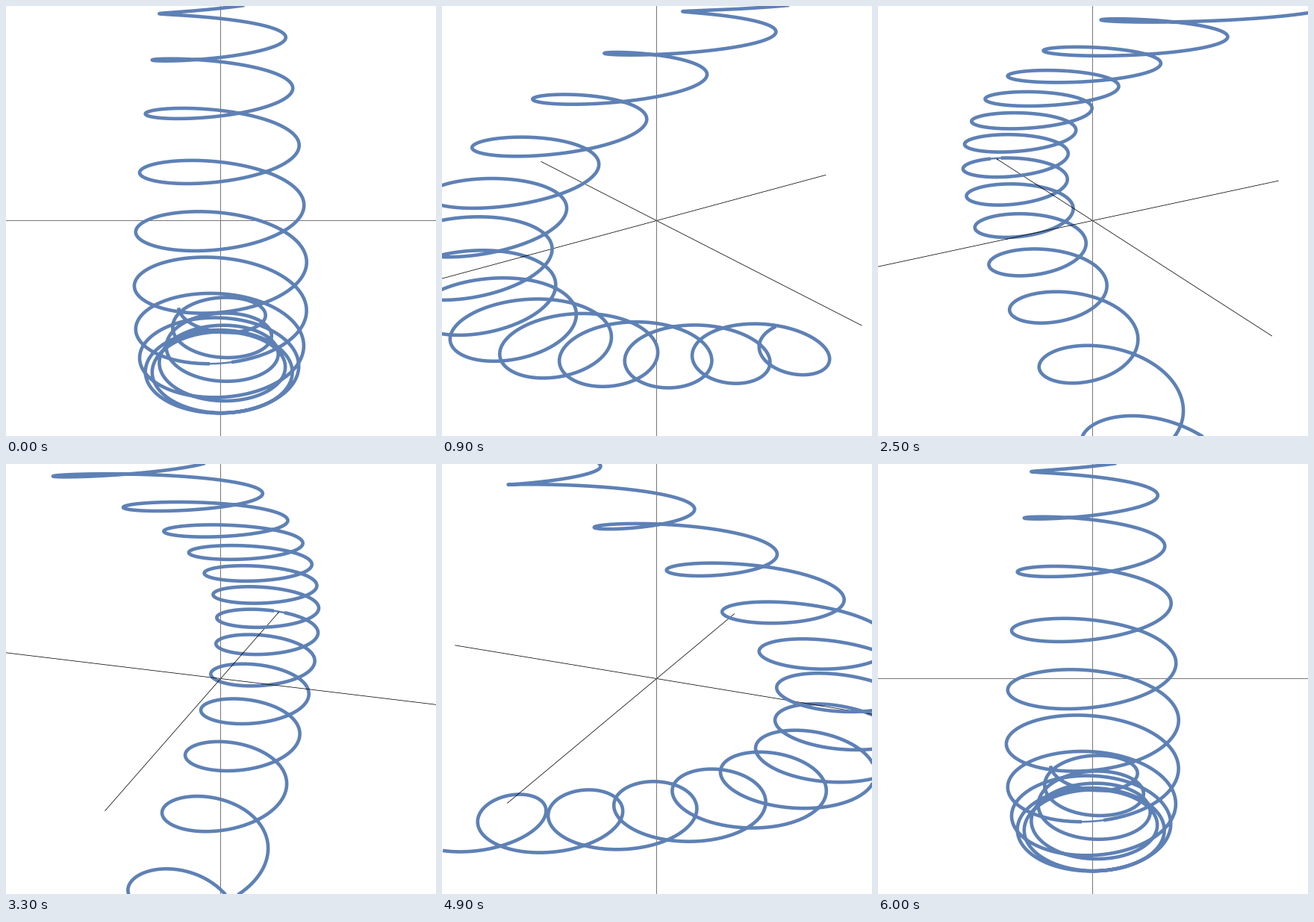
These frames come from a looping animation (576x576 px, 6100 ms). A matplotlib script:

```python
import numpy as np
import matplotlib.pyplot as plt
from matplotlib.animation import FuncAnimation

SIZE, DPI = 576, 100
PX = 72 / DPI              # one pixel in points
FRAMES, STEP_MS = 61, 100
CENTER = 287.5
FOCAL = 908
CAM_DIST, CAM_HEIGHT = 10, 4
TILT = CAM_HEIGHT / CAM_DIST
RISE = 1.005               # height gained per unit of t
T_END = 3.783              # the coil is cut where x reaches -4
BLUE = "#5e81b5"
STROKE = 4.6


def coil(t):
    """Helix wound around a parabola."""
    return np.array([3 - t**2 / 2 + np.cos(12 * t), np.sin(12 * t), RISE * t])


def project(points, angle):
    """Orbit the camera around z; return screen x, screen y and depth."""
    x, y, z = points
    c, s = np.cos(angle), np.sin(angle)
    right = y * c - x * s
    near = y * s + x * c
    dist = CAM_DIST - near
    drop = CAM_HEIGHT - z
    depth = (dist + TILT * drop) / np.hypot(1, TILT)
    lower = (drop - TILT * dist) / np.hypot(1, TILT)
    return CENTER + FOCAL * right / depth, CENTER + FOCAL * lower / depth, depth


def crossing(line, curve):
    """Keep only the parts of a line that pass in front of the curve."""
    lx, ly, ld = (a[:, None] for a in line)
    cx, cy, cd = curve
    touching = (lx - cx) ** 2 + (ly - cy) ** 2 < (STROKE / 2 + 0.5) ** 2
    over = touching.any(axis=1) & ~(touching & (cd < ld)).any(axis=1)
    return np.where(over, line[0], np.nan), line[1]


t = np.linspace(-T_END, T_END, 2401)
COIL = coil(t)
# The stroke is shaved where it touches the plane x = 4.
GRAZE = np.abs(t) < 0.009
TIP = coil(np.linspace(-0.011, 0.011, 9))

span = np.linspace(-4, 4, 400)
zero = np.zeros_like(span)
AXES = [
    np.array([span, zero, zero]),
    np.array([zero, span, zero]),
    np.array([zero, zero, span * 1.25]),
]

fig = plt.figure(figsize=(SIZE / DPI, SIZE / DPI), dpi=DPI, facecolor="white")
ax = fig.add_axes([0, 0, 1, 1])
ax.set_xlim(0, SIZE)
ax.set_ylim(SIZE, 0)
ax.axis("off")


def stroke(width, zorder, color=BLUE):
    line, = ax.plot([], [], color=color, lw=width * PX, zorder=zorder,
                    solid_capstyle="butt", solid_joinstyle="round", snap=False)
    return line


main = stroke(STROKE, 2)
tip = stroke(STROKE * 0.55, 2)
under = [stroke(1, 1) for _ in AXES]
over = [stroke(1, 3) for _ in AXES]


def style_rod(rod, aligned):
    rod.set_color("#777777" if aligned else "black")
    rod.set_linewidth((1 if aligned else 0.75) * PX)


def draw(i):
    angle = np.radians(6 * (i % 60))
    curve = np.array(project(COIL, angle))
    main.set_data(np.where(GRAZE, np.nan, curve[0]), curve[1])
    tip.set_data(*project(TIP, angle)[:2])
    for k, points in enumerate(AXES):
        line = project(points, angle)
        under[k].set_data(line[0], line[1])
        over[k].set_data(*crossing(line, curve))
        for rod in (under[k], over[k]):
            style_rod(rod, k == 2 or i % 15 == 0)
    return [main, tip, *under, *over]


anim = FuncAnimation(fig, draw, frames=FRAMES, interval=STEP_MS, repeat=True,
                     repeat_delay=0)
plt.show()
```
